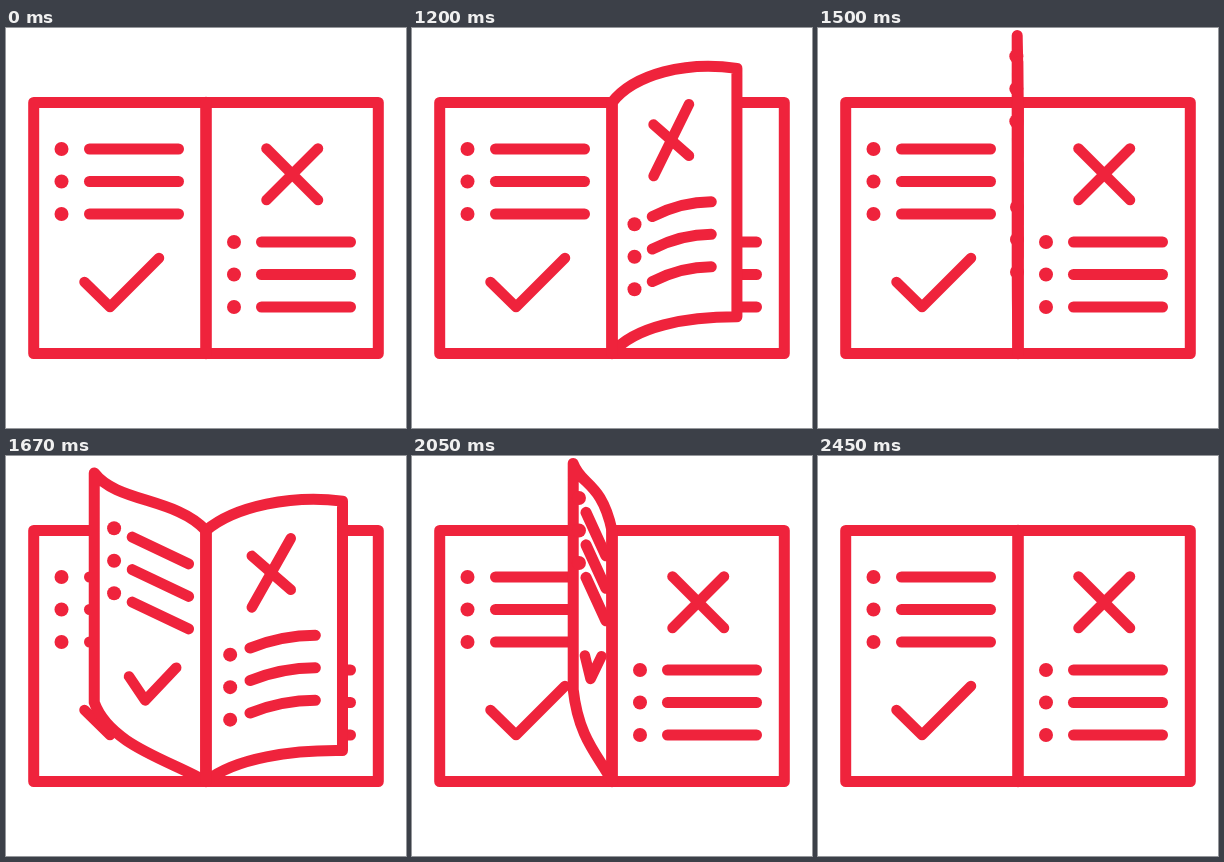
An HTML page with a canvas for the animation above (2470 ms loop, 400 by 400 pixels).

```html
<!DOCTYPE html>
<html lang="en">
<head>
<meta charset="utf-8">
<title>Turning pages</title>
<style>
  html, body { margin: 0; width: 100%; height: 100%; overflow: hidden; background: #fff; }
  canvas { display: block; width: 400px; height: 400px; }
</style>
</head>
<body>
<canvas id="stage" width="400" height="400"></canvas>
<script>
const ctx = document.getElementById('stage').getContext('2d');
const LOOP = 2470;
const STARTS = [1010, 1510];
const RISE = 490, FALL = 450;
const SPINE = 200, TOP = 74.5, BOTTOM = 325.5, HALF = 172.3;
const LEFT_ROWS = [121, 153.5, 186];
const RIGHT_ROWS = [214, 246.5, 279];
const RED = '#ef233c';

function stroke(width, trace) {
  ctx.lineWidth = width;
  ctx.beginPath();
  trace();
  ctx.stroke();
}

function polyline(width, ...points) {
  stroke(width, () => points.forEach(p => ctx.lineTo(...p)));
}

function dot([x, y]) {
  ctx.beginPath();
  ctx.arc(x, y, 7, 0, Math.PI * 2);
  ctx.fillStyle = RED;
  ctx.fill();
}

// Closed sheet: each edge lists [dx, lift] for two controls and the outer corner.
function sheet(top, bottom) {
  const at = (y, [dx, lift]) => [SPINE + dx, y - lift];
  const [t1, t2, t3] = top.map(p => at(TOP, p));
  const [b1, b2, b3] = bottom.map(p => at(BOTTOM, p));
  stroke(11, () => {
    ctx.moveTo(SPINE, TOP);
    ctx.bezierCurveTo(...t1, ...t2, ...t3);
    ctx.lineTo(...b3);
    ctx.bezierCurveTo(...b2, ...b1, SPINE, BOTTOM);
    ctx.closePath();
    ctx.fillStyle = '#fff';
    ctx.fill();
  });
}

// turn: 0 flat, 1 upright; lift: relative height of the bend
function rightContent(turn, lift) {
  const warp = (x, y, rise, power) =>
    [SPINE + (x - SPINE) * (1 - turn ** power), y - rise * lift];
  for (const y of RIGHT_ROWS) {
    const [dx, dy] = warp(228, y, 35, 1.3);
    dot([dx - turn, dy]);
    const a = warp(255.5, y, 50, 1), b = warp(344.5, y, 79, 0.9);
    stroke(11, () => {
      ctx.moveTo(...a);
      ctx.quadraticCurveTo((a[0] + b[0]) / 2, y - 79 * lift, ...b);
    });
  }
  const near = y => warp(260.5, y, 47, 0.9);
  const far = y => warp(312, y, 87, 0.9);
  polyline(10.5, near(120.5), far(172));
  polyline(10.5, far(120.5), near(172));
}

function leftContent(turn, lift) {
  const warp = (x, y, rise) => [x + (SPINE - x) * turn, y - rise * lift];
  for (const y of LEFT_ROWS) {
    const [dx, dy] = warp(55.5, y, 93);
    dot([dx - turn, dy]);
    polyline(11, warp(83.5, y, 76), warp(172.5, y, 25));
  }
  polyline(10.5, warp(78.5, 254, 64), warp(104, 279, 66), warp(153, 230, 35));
}

function rightSheet(s, turn, lift) {
  const w = HALF * (1 - turn);
  const c1 = w * Math.max(0, 0.4 - 0.57 * s), c2 = w * (0.85 - 0.65 * s);
  sheet([[c1, 56 * lift], [c2, 82 * lift], [w, 67 * lift]],
        [[c1, 54 * lift], [c2, 72 * lift], [w, 94 * s]]);
}

function leftSheet(v) {
  const turn = (Math.max(0, v - 0.12) / 0.88) ** 1.85;
  const lift = Math.min(1, v * (0.33 + 3.39 * v - 2.72 * v * v));
  const w = -HALF * (1 - turn), top = 67 * lift, low = 92 * lift;
  sheet([[w * 0.27, top * (0.2 + 0.6 * v)], [w * 0.8, top * (0.05 + 0.7 * v)], [w, top]],
        [[w * 0.3, low * 0.26], [w * 0.86, low * 0.45], [w, low]]);
}

function turningPage(elapsed) {
  if (elapsed <= 0 || elapsed >= RISE + FALL) return;
  const upright = Math.abs(elapsed - RISE) < 10;
  if (elapsed <= RISE) {
    const s = elapsed / RISE;
    const turn = Math.min(1, s * s * (2.65 - 2.478 * s + 0.828 * s * s));
    const lift = 1.5 * s - 0.5 * s * s;
    rightSheet(s, turn, lift);
    rightContent(turn, lift);
    if (upright) leftContent(1, 1);
  } else {
    const v = 1 - (elapsed - RISE) / FALL;
    leftSheet(v);
    leftContent(v ** 2.1, v ** 1.35);
    if (upright) rightContent(1, 1);
  }
}

function draw() {
  const t = performance.now() % LOOP;
  ctx.fillStyle = '#fff';
  ctx.fillRect(0, 0, 400, 400);
  ctx.strokeStyle = RED;
  ctx.lineCap = ctx.lineJoin = 'round';

  stroke(11, () => ctx.rect(SPINE - HALF, TOP, HALF * 2, BOTTOM - TOP));
  leftContent(0, 0);
  rightContent(0, 0);
  for (const start of STARTS) turningPage(t - start);
  polyline(11.6, [SPINE, TOP], [SPINE, BOTTOM]);
  requestAnimationFrame(draw);
}
draw();
</script>
</body>
</html>
```
